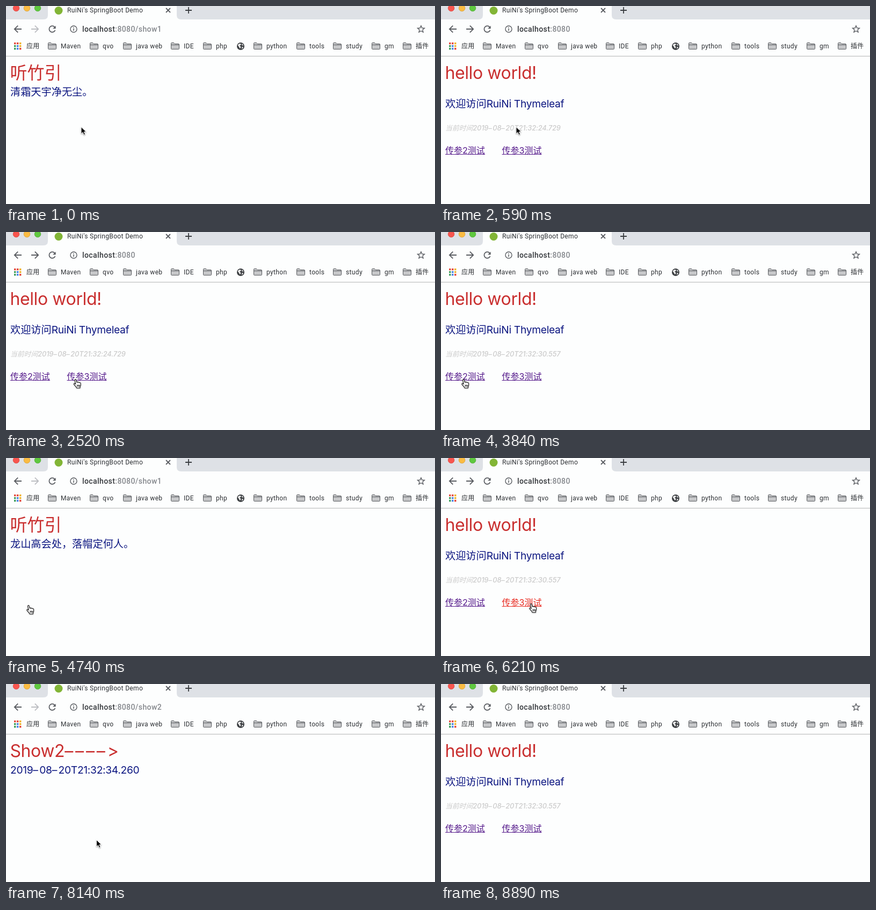
Animation of 799 by 369 pixels, one loop 9040 ms. Source, as an HTML page:

```html
<!DOCTYPE html>
<html lang="zh-CN">
<head>
<meta charset="utf-8">
<title>SpringBoot Demo</title>
<style>
  html, body { margin: 0; width: 100%; height: 100%; overflow: hidden; background: #fdfefe; }
  svg { display: block; }
  text { white-space: pre; }
  .ui { font: 12px Roboto, "Noto Sans CJK SC", "Noto Sans CJK", sans-serif; letter-spacing: .35px; fill: #2c2f33; }
  .url { font-size: 14px; font-weight: 500; letter-spacing: .4px; fill: #33363a; }
  .url tspan { fill: #85888d; }
  .page { font: 19.2px Inter, "Noto Sans CJK SC", "Noto Sans CJK", sans-serif; letter-spacing: -.015em; fill: #0b1580; }
  .page .title { font-size: 32px; fill: #c92f2f; letter-spacing: -.012em; }
  .page .time { font-size: 12.8px; font-weight: 500; font-style: italic; fill: #cbcbcb; letter-spacing: -.008em; }
  .page .cjk { letter-spacing: 0; }
  .page .dash { letter-spacing: .12em; }
  .link { font-size: 16px; letter-spacing: 0; fill: #551a8b; stroke: none; }
  .link line { stroke: #551a8b; }
  .link.active { fill: #e8291f; }
  .link.active line { stroke: #e8291f; }
  .icon { fill: none; stroke: #5a5d62; stroke-width: 1.8; }
  .off { stroke: #bcbec2; }
</style>
</head>
<body>
<svg width="799" height="369" viewBox="0 0 799 369">
  <defs>
    <g id="folder" stroke="#55585c" stroke-linejoin="round">
      <path d="M.5 11.5V1.5Q.5.5 1.5.5H5.5L7.5 2.5H14Q15.5 2.5 15.5 4V11.5Q15.5 12.5 14.5 12.5H1.5Q.5 12.5.5 11.5Z" fill="#c6c7c9"/>
      <path d="M1 4.5H15" fill="none"/>
    </g>
  </defs>

  <rect width="799" height="369" fill="#fdfefe"/>
  <rect width="799" height="25" fill="#dee1e6"/>
  <path d="M70 25Q78 25 78 17V0H318V17Q318 25 326 25Z" fill="#fdfefe"/>
  <g stroke-width=".8">
    <circle cx="19" cy="4" r="5.8" fill="#f8554e" stroke="#dc4640"/>
    <circle cx="39" cy="4" r="5.8" fill="#fabb42" stroke="#dba033"/>
    <circle cx="59" cy="4" r="5.8" fill="#5fc83f" stroke="#4dac30"/>
  </g>
  <circle cx="98" cy="8.5" r="7.5" fill="#82b536"/>
  <text class="ui" x="114" y="12">RuiNi's SpringBoot Demo</text>
  <path class="icon" d="M298 4L306 12M306 4L298 12"/>
  <path class="icon" style="stroke:#3a3d41" d="M334 8H346M340 2V14"/>

  <path class="icon" d="M29 43H16M22.2 36.6L15.8 43L22.2 49.4"/>
  <path class="icon" id="forward" d="M47 43H60M53.8 36.6L60.2 43L53.8 49.4"/>
  <path class="icon" d="M90.6 39.2A5.8 5.8 0 1 0 91.6 45"/>
  <path d="M92.6 36.8V42.3H87.1Z" fill="#5a5d62"/>
  <circle class="icon" cx="126" cy="43" r="6" style="stroke-width:1.4"/>
  <path class="icon" style="stroke-width:1.5" d="M126 42V46.3M126 39.4V40.9"/>
  <text class="ui url" x="142" y="48">localhost<tspan id="path"></tspan></text>
  <path class="icon" style="stroke-width:1.4" d="M773 36.8L774.8 41L779.4 41.4L775.9 44.4L777 48.9L773 46.5L769 48.9L770.1 44.4L766.6 41.4L771.2 41Z"/>

  <g id="apps"></g>
  <text class="ui" x="38" y="79">应用</text>
  <g id="marks"></g>
  <circle cx="437" cy="75" r="7" fill="#3d4043"/>
  <path d="M431.6 72.5Q434 69.5 436.5 70L438 72L435 74L437.5 76L436 79.5L434 76.5Z M439 70Q442 71.5 442.2 74L439.5 73Z M439.5 76L442 76.5Q441 79 439 80Z" fill="#f4f4f4"/>
  <path d="M0 93.5H799" stroke="#b4b5b6"/>

  <g class="page" id="show">
    <text class="title" id="head" x="7.4" y="136"></text>
    <text id="line" x="8" y="167"></text>
  </g>
  <g class="page" id="home">
    <text class="title" x="7.4" y="136">hello world!</text>
    <text x="8" y="189"><tspan class="cjk">欢迎访问</tspan>RuiNi Thymeleaf</text>
    <text class="time" x="8" y="232"><tspan class="cjk">当前时间</tspan><tspan id="stamp"></tspan></text>
    <g class="link" id="link2"><text x="8" y="275">传参2测试</text><line x1="8" x2="82" y1="276.5" y2="276.5"/></g>
    <g class="link" id="link3"><text x="113.5" y="275">传参3测试</text><line x1="113.5" x2="187.5" y1="276.5" y2="276.5"/></g>
  </g>

  <g id="cursor">
    <path id="arrow" d="M.5.5V13.2L3.5 10.4L5.7 15.3L8 14.3L5.9 9.6H9.8Z" fill="#000" stroke="#fff" style="filter:drop-shadow(0 1px 1px #0006)"/>
    <g id="hand" transform="translate(-.6 -.8)" stroke="#111" stroke-width="1.1" stroke-linejoin="round" style="filter:drop-shadow(0 1px 1px #0004)">
      <path fill="#fff" d="M2.6 2C2.3.3 4.6-.2 5.1 1.5L6.3 6C6.6 4.8 8.6 4.9 8.8 6.3C9.3 5.2 11.1 5.4 11.3 6.8C12 6 13.6 6.5 13.7 8C14 11 13.5 12.5 12.6 14L12.4 16.5H6.4C5.5 14 3 12 1.2 9.7C.3 8.4 1.8 7.4 3 8.4L4.3 9.5Z"/>
      <path fill="none" d="M7.3 10.5V14M9.3 10.5V14M11.2 10.5V14"/>
    </g>
  </g>
</svg>
<script>
const $ = id => document.getElementById(id);
const LOOP = 9040;

// bookmark bar
const tints = ['#e5483b', '#e5483b', '#f0b429', '#3c9e57', '#4682e8', '#f0b429', '#3c9e57', '#4682e8', '#e5483b'];
$('apps').innerHTML = tints.map((c, i) =>
  `<rect x="${15 + i % 3 * 5}" y="${68 + Math.floor(i / 3) * 5}" width="3.4" height="3.4" fill="${c}"/>`).join('');
const marks = { Maven: 78, qvo: 156, 'java web': 218, IDE: 307, php: 367, python: 461, tools: 541, study: 609, gm: 681, '插件': 739 };
$('marks').innerHTML = Object.entries(marks).map(([name, x]) =>
  `<use href="#folder" x="${x}" y="68"/><text class="ui" x="${x + 24}" y="79">${name}</text>`).join('');

// time, page, changing text
const pages = [
  [0, 'show1', '清霜天宇净无尘。'],
  [590, 'home', '24.729'],
  [1470, 'show2', '28.255'],
  [2370, 'home', '24.729'],
  [3840, 'home', '30.557'],
  [4740, 'show1', '龙山高会处，落帽定何人。'],
  [5330, 'home', '30.557'],
  [6500, 'show2', '33.218'],
  [7390, 'show2', '34.260'],
  [8290, 'home', '30.557']
];

// time, pressed link
const presses = [[0, ''], [1330, 'link3'], [1470, ''], [4440, 'link2'], [4590, ''], [6210, 'link3'], [6360, '']];

// time, cursor shape, x, y
const moves = [
  [0, 'arrow', 139.5, 225], [890, 'arrow', 140, 236], [1030, 'arrow', 142, 254], [1180, 'hand', 141, 273],
  [2370, 'hand', 138, 274], [2520, 'hand', 126, 275],
  [3250, 'hand', 116, 276], [3400, 'arrow', 92, 277], [3550, 'hand', 58, 276], [3700, 'hand', 38.5, 275],
  [5470, 'hand', 62, 274], [5620, 'arrow', 100, 273], [5770, 'hand', 146, 272], [5910, 'hand', 164.5, 272],
  [8140, 'arrow', 168, 290], [8290, 'arrow', 176, 338], [8440, ''],
  [8740, 'arrow', 793, 366], [8890, '']
];

const at = (rows, t) => rows.findLast(row => row[0] <= t);
const show = (id, on) => { $(id).style.display = on ? '' : 'none'; };
const date = s => '2019–08–20T21:32:' + s;

// text whose dashes are set wider apart
const write = (id, s) => {
  $(id).innerHTML = s.replace(/–+/g, '<tspan class="dash">$&</tspan>');
};

function draw(t) {
  const [, page, text] = at(pages, t);
  const home = page === 'home', poem = page === 'show1';
  show('home', home);
  show('show', !home);
  $('forward').classList.toggle('off', !home);
  $('path').textContent = home ? ':8080' : ':8080/' + page;
  if (home) {
    write('stamp', date(text));
  } else {
    write('head', poem ? '听竹引' : 'Show2––––>');
    write('line', poem ? text : date(text));
    for (const id of ['head', 'line']) $(id).classList.toggle('cjk', poem);
  }
  const pressed = at(presses, t)[1];
  for (const id of ['link2', 'link3']) $(id).classList.toggle('active', id === pressed);

  const [, shape, x = 0, y = 0] = at(moves, t);
  show('arrow', shape === 'arrow');
  show('hand', shape === 'hand');
  $('cursor').setAttribute('transform', `translate(${x} ${y})`);
}

const start = performance.now();
function tick() {
  draw((performance.now() - start) % LOOP);
  requestAnimationFrame(tick);
}
tick();
</script>
</body>
</html>
```
